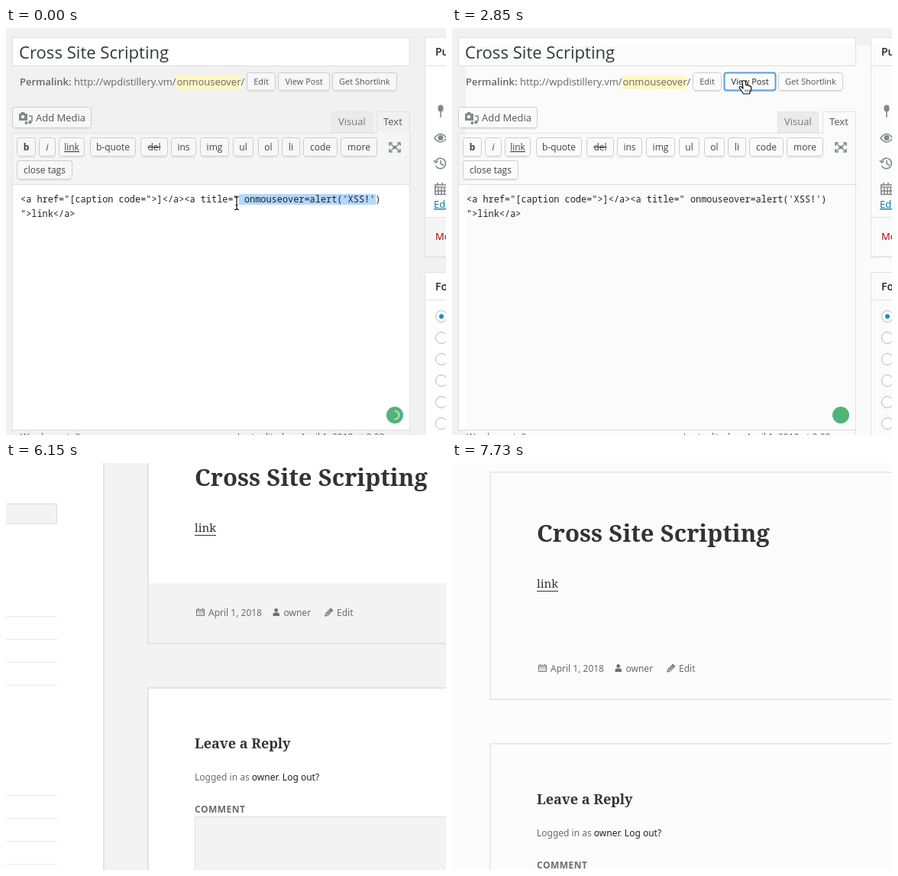
An HTML page that plays this animation: 576x532 px, repeating every 8000 ms.

```html
<!DOCTYPE html>
<html lang="en">
<head>
<meta charset="utf-8">
<title>Cross Site Scripting</title>
<style>
  html, body { margin: 0; width: 100%; height: 100%; overflow: hidden; }
  svg { display: block; width: 576px; height: 532px; }
  text { white-space: pre; }
  .ui { font-family: "Open Sans", sans-serif; font-size: 13px; }
  .mono { font-family: "Noto Sans Mono", monospace; font-size: 11.91px; fill: #222; }
  .serif { font-family: "Noto Serif", serif; fill: #333; }
  .sans { font-family: "Noto Sans", sans-serif; font-size: 12px; fill: #6b6b6b; }
  .btn { fill: var(--btn); stroke: #ccc; }
  .icon { fill: none; stroke: #82878c; stroke-width: 1.6; }
  .solid { fill: #82878c; }
</style>
</head>
<body>
<svg id="stage" viewBox="0 0 576 532" xmlns="http://www.w3.org/2000/svg"></svg>
<script>
const LOOP = 8000;
const stage = document.getElementById('stage');

function add(parent, tag, attrs = {}, content) {
  const node = document.createElementNS('http://www.w3.org/2000/svg', tag);
  for (const key in attrs) node.setAttribute(key, attrs[key]);
  if (content !== undefined) node.textContent = content;
  parent.appendChild(node);
  return node;
}
const group = (parent, attrs) => add(parent, 'g', attrs);
const rect = (p, x, y, width, height, attrs) => add(p, 'rect', { x, y, width, height, ...attrs });
const path = (p, d, attrs) => add(p, 'path', { d, ...attrs });
const text = (p, x, y, content, attrs) => add(p, 'text', { x, y, ...attrs }, content);
const show = (node, on) => { node.style.display = on ? '' : 'none'; };

// Last row of a step table whose time has been reached
const at = (table, t) => table.reduce((hit, row) => row[0] <= t ? row : hit, table[0]);

function button(p, x, y, w, h, label, base, attrs = {}) {
  const g = group(p);
  path(g, `M${x + 2} ${y + h + 1}H${x + w - 2}`, { stroke: '#ddd' });
  const box = rect(g, x + .5, y + .5, w - 1, h - 1, { rx: 3, class: 'btn' });
  const caption = text(g, x + w / 2, base, label, { 'text-anchor': 'middle', fill: '#555', ...attrs });
  return { box, caption };
}

// ---------- Editor screen ----------
const editor = group(stage, { class: 'ui' });
rect(editor, 0, 0, 576, 532, { fill: '#f1f1f1' });
rect(editor, 8, 12, 521, 38, { fill: '#fff' });
rect(editor, 8, 137, 521, 68, { fill: '#f5f5f5' });
rect(editor, 8, 205, 521, 321, { fill: '#fff' });
rect(editor, 548, 12, 40, 236, { fill: '#fff' });
rect(editor, 548, 248, 40, 51, { fill: '#f5f5f5' });
rect(editor, 548, 319, 40, 220, { fill: '#fff' });
const veil = rect(editor, 18, 23, 558, 509, { fill: '#fbfbfb' });

// Title and permalink
rect(editor, 8.5, 12.5, 520, 37, { fill: 'none', stroke: '#ddd' });
text(editor, 17, 40, 'Cross Site Scripting', { 'font-size': 22.1, fill: '#32373c' });
rect(editor, 223, 62, 84, 18, { fill: '#fff8c4' });
text(editor, 18, 75, 'Permalink:', { 'font-weight': 600, fill: '#666' });
text(editor, 89, 75, 'http://wpdistillery.vm/', { fill: '#666' });
text(editor, 223.5, 75, 'onmouseover', { fill: '#666' });
text(editor, 307.5, 75, '/', { fill: '#666' });
const small = { 'font-size': 11 };
button(editor, 315, 58, 38, 24, 'Edit', 74, small);
const view = button(editor, 356, 58, 68, 24, 'View Post', 74, small);
button(editor, 427, 58, 85, 24, 'Get Shortlink', 74, small);

// Media button and tabs
button(editor, 8, 103, 104, 28, '', 122);
text(editor, 39, 122, 'Add Media', { fill: '#555' });
path(editor, 'M17 112h2l1-2h4l1 2h3v9h-11z', { class: 'solid' });
add(editor, 'circle', { cx: 22, cy: 116, r: 2.3, fill: '#f7f7f7' });
path(editor, 'M30 115h4v7', { class: 'icon' });
add(editor, 'circle', { cx: 31.5, cy: 123, r: 2.2, class: 'solid' });
add(editor, 'circle', { cx: 26.5, cy: 124, r: 2, class: 'solid' });
rect(editor, 426.5, 109.5, 53, 27, { fill: '#ebebeb', stroke: '#e5e5e5' });
text(editor, 435, 127, 'Visual', { fill: '#777' });
path(editor, 'M8.5 137.5H485.5V109.5H528.5V532M8.5 137.5V532', { fill: 'none', stroke: '#e2e2e2' });
text(editor, 494, 127, 'Text', { fill: '#555' });

// Toolbar
const tags = [
  ['b', 14, 25, { 'font-weight': 700 }], ['i', 43, 22, { 'font-style': 'italic' }],
  ['link', 69, 34, { 'text-decoration': 'underline' }], ['b-quote', 110, 60],
  ['del', 176, 36, { 'text-decoration': 'line-through' }], ['ins', 216, 33], ['img', 254, 38],
  ['ul', 297, 27], ['ol', 330, 27], ['li', 361, 24], ['code', 389, 45], ['more', 438, 48]
];
for (const [label, x, w, style] of tags)
  button(editor, x, 143, w, 25, label, 160, { 'font-size': 12, fill: '#444', ...style });
button(editor, 14, 173, 73, 25, 'close tags', 190, { 'font-size': 12, fill: '#444' });
path(editor, 'M502 154v-4h4M512 150h4v4M516 158v4h-4M506 162h-4v-4M503 151l4 3.5M515 151l-4 3.5M515 161l-4-3.5M503 161l4-3.5',
  { class: 'icon', 'stroke-width': 1.4 });
rect(editor, 506.5, 154, 5, 4, { class: 'solid' });
path(editor, 'M8 204.5H529M8 525.5H529', { stroke: '#ddd' });

// Markup
const selection = rect(editor, 305, 217, 179, 14, { fill: '#b3d7fe' });
text(editor, 19, 228, `<a href="[caption code=">]</a><a title=" onmouseover=alert('XSS!')`, { class: 'mono' });
text(editor, 19, 247, '">link</a>', { class: 'mono' });
text(editor, 19, 539, 'Word count: 9', { 'font-size': 12, fill: '#666' });
text(editor, 517, 539, 'Last edited on April 1, 2018 at 3:28 pm',
  { 'font-size': 12, fill: '#666', 'text-anchor': 'end' });

// Checker badge
add(editor, 'circle', { cx: 509, cy: 506, r: 11, fill: '#52b377' });
const spinner = path(editor, 'M509 500.5A5.5 5.5 0 0 1 509 511.5',
  { fill: 'none', stroke: '#d5eedd', 'stroke-width': 1.5, 'stroke-linecap': 'round' });

// Side boxes
path(editor, 'M580 12.5H548.5V299H580M548 49.5H576M548 247.5H576M580 319.5H548.5V540M548 355.5H576',
  { fill: 'none', stroke: '#e2e2e2' });
path(editor, 'M548 299.5H576', { stroke: '#ddd' });
text(editor, 562, 36, 'Publish', { 'font-size': 14, 'font-weight': 600, fill: '#23282d' });
text(editor, 562, 343, 'Format', { 'font-size': 14, 'font-weight': 600, fill: '#23282d' });
text(editor, 560, 235, 'Edit', { fill: '#0073aa', 'text-decoration': 'underline' });
text(editor, 562, 277, 'Move to Trash', { fill: '#a00' });
path(editor, 'M569 108v9', { class: 'icon' });
add(editor, 'ellipse', { cx: 569, cy: 105, rx: 3.6, ry: 4.5, class: 'solid' });
path(editor, 'M561 144q8-11 16 0q-8 10-16 0z', { class: 'icon' });
add(editor, 'circle', { cx: 569, cy: 143.5, r: 3.5, class: 'solid' });
path(editor, 'M562.5 174a6.8 6.8 0 1 1 0 6M569 173v4.5l4 2M560 173l2.5 3 3-2', { class: 'icon' });
path(editor, 'M561.8 205h16v12.500h-16zM562 208h15M565 202v4M571 202v4M566 209v8M570 209v8M574 209v8M562 213h15', { class: 'icon', 'stroke-width': 1.4 });
for (let i = 0; i < 6; i++)
  add(editor, 'circle', { cx: 570, cy: 377 + 28 * i, r: 7.5, fill: '#fff', stroke: '#b4b9be' });
add(editor, 'circle', { cx: 570, cy: 377, r: 3, fill: '#1e8cbe' });

// Pointers, drawn around their hot spot
const outline = { fill: '#fff', stroke: '#111', 'stroke-width': 1.2, 'stroke-linejoin': 'round' };
const pointers = { beam: group(editor), arrow: group(editor), hand: group(editor) };
path(pointers.beam, 'M-3 -8.500Q0 -8.500 0 -6.500Q0 -8.500 3 -8.500M0 -7V7M-3 8.500Q0 8.500 0 6.500Q0 8.500 3 8.500M-1.500 2.500H1.500',
  { fill: 'none', stroke: '#111', 'stroke-width': 1.2 });
path(pointers.arrow, 'M0 0V15L3.500 11.800L6 17.500L8.500 16.400L6 11H11Z', { ...outline, fill: '#111', stroke: '#fff' });
path(pointers.hand, 'M-2 0Q0 -3 2 0L3 5Q5 3.500 6 5.500Q8 4.500 8.500 6.500Q10 6 10 8.500L9 12L7.500 16H-0.500L-3 12L-6 8Q-5.500 5.500 -3 7L-1 9Z', outline);
path(pointers.hand, 'M2 10.500V13.500M4.500 10.500V13.500M7 10.500V13.500', { stroke: '#111', 'stroke-width': .8 });

// ---------- Published post ----------
const post = group(stage);
rect(post, 0, 0, 576, 532, { fill: 'var(--page)' });
const sheet = group(post, { fill: 'none', stroke: 'var(--line)' });
rect(sheet, -300, -100, 303, 800, { fill: 'var(--paper)', 'stroke-width': 1.6 });
rect(sheet, -300, 90.5, 241.5, 26, { fill: 'var(--page)' });
for (const top of [237.5, 471.5])
  for (let i = 0; i < 4; i++) path(sheet, `M-300 ${top + 30 * i}H-58`, { stroke: '#e8e8e8' });
rect(sheet, 61, -24, 700, 297, { fill: 'var(--paper)', 'stroke-width': 1.6 });
rect(sheet, 62, 194, 698, 78, { fill: 'var(--page)', stroke: 'none' });
rect(sheet, 61, 331, 700, 500, { fill: 'var(--paper)', 'stroke-width': 1.6 });
rect(sheet, 122.5, 499.5, 600, 200, { fill: 'var(--page)' });
const bareLine = path(sheet, 'M122 129.500H146', { stroke: '#333' });

const copy = group(sheet, { stroke: 'none' });
text(copy, 122, 67, 'Cross Site Scripting', { class: 'serif', 'font-size': 31, 'font-weight': 700 });
text(copy, 122, 127, 'link', { class: 'serif', 'font-size': 15 });
path(copy, 'M122 131.500H150', { stroke: '#333' });
text(copy, 140, 237, 'April 1, 2018', { class: 'sans' });
text(copy, 238.500, 237, 'owner', { class: 'sans' });
text(copy, 308, 237, 'Edit', { class: 'sans' });
text(copy, 122, 410, 'Leave a Reply', { class: 'serif', 'font-size': 18, 'font-weight': 700 });
const logged = text(copy, 122, 452, 'Logged in as ', { class: 'sans' });
add(logged, 'tspan', { fill: '#222' }, 'owner');
add(logged, 'tspan', {}, '. ');
add(logged, 'tspan', { fill: '#222' }, 'Log out?');
text(copy, 122, 494, 'COMMENT', { class: 'sans', 'font-weight': 700, 'letter-spacing': '.04em' });
const glyph = { fill: 'none', stroke: '#707070' };
path(copy, 'M124.500 228.500h10v8h-10zM124 230.500h11M126.500 226.500v2M132.500 226.500v2', glyph);
path(copy, 'M126.500 232.500h7M126.500 234.500h7', { ...glyph, 'stroke-dasharray': '1 1' });
add(copy, 'circle', { cx: 228.7, cy: 229.500, r: 2.4, fill: '#707070' });
path(copy, 'M224.500 237v-2q0-2.500 2.500-2.500h3.500q2.500 0 2.500 2.500v2z', { fill: '#707070' });
path(copy, 'M293 237l.7-3.200 6.500-6.500 2.500 2.500-6.500 6.500zM299 228.500l2.500 2.500M295 235l5-5', { ...glyph, 'stroke-width': 1.2 });

// ---------- Timeline ----------
const pointerSteps = [
  [0, 302, 229, 'beam'], [330, 304, 230, 'beam'], [480, 307, 233, 'beam'], [630, 310, 235, 'beam'],
  [1510, 322, 205, 'beam'], [1660, 345, 160, 'arrow'], [1810, 368, 110, 'arrow'],
  [1960, 380, 80, 'hand'], [2110, 382, 70, 'hand'],
  [3600, 377, 98, 'arrow'], [3750, 368, 72, 'hand'], [3900, 358, 38, 'arrow'],
  [4050, 350, 8, 'arrow'], [4200, 0, 0, 'none']
];
// time, dx, dy, page, paper, line
const postSteps = [
  [5700, 125, -37, '#f3f3f3', '#fff', '#dedede'],
  [6940, 0, 0, '#fafafa', '#fafafa', '#e5e5e5'],
  [7300, -7, 25, '#fcfcfc', '#fcfcfc', '#e5e5e5'],
  [7430, -10, 35, '#fcfcfc', '#fcfcfc', '#e5e5e5'],
  [7580, -11, 36, '#fcfcfc', '#fcfcfc', '#e5e5e5']
];

function drawEditor(t) {
  const [, x, y, kind] = at(pointerSteps, t);
  for (const name in pointers) {
    show(pointers[name], name === kind);
    pointers[name].setAttribute('transform', `translate(${x} ${y})`);
  }
  const focused = t >= 2550, hover = kind === 'hand';
  view.box.style.stroke = focused ? '#5b9dd9' : hover ? '#999' : '';
  view.box.style.strokeWidth = focused ? 2 : 1;
  view.caption.style.fill = focused || hover ? '#23282d' : '';
  show(selection, !focused);
  show(veil, t >= 1510);
  editor.style.setProperty('--btn', t >= 1510 ? '#fbfbfb' : '#f7f7f7');
  show(spinner, t < 1360);
  const turn = t < 330 ? 0 : 1 + Math.floor((t - 330) / 147);
  spinner.setAttribute('transform', `rotate(${turn * 50} 509 506)`);
}

function drawPost(t) {
  const [, x, y, page, paper, line] = at(postSteps, t);
  sheet.setAttribute('transform', `translate(${x} ${y})`);
  post.style.setProperty('--page', page);
  post.style.setProperty('--paper', paper);
  post.style.setProperty('--line', line);
  show(copy, t >= 6000);
  show(bareLine, t < 6000);
}

function draw(t) {
  const published = t >= 5700;
  show(editor, !published);
  show(post, published);
  (published ? drawPost : drawEditor)(t);
}

const start = performance.now();
function tick() {
  draw((performance.now() - start) % LOOP);
  requestAnimationFrame(tick);
}
tick();
</script>
</body>
</html>
```
